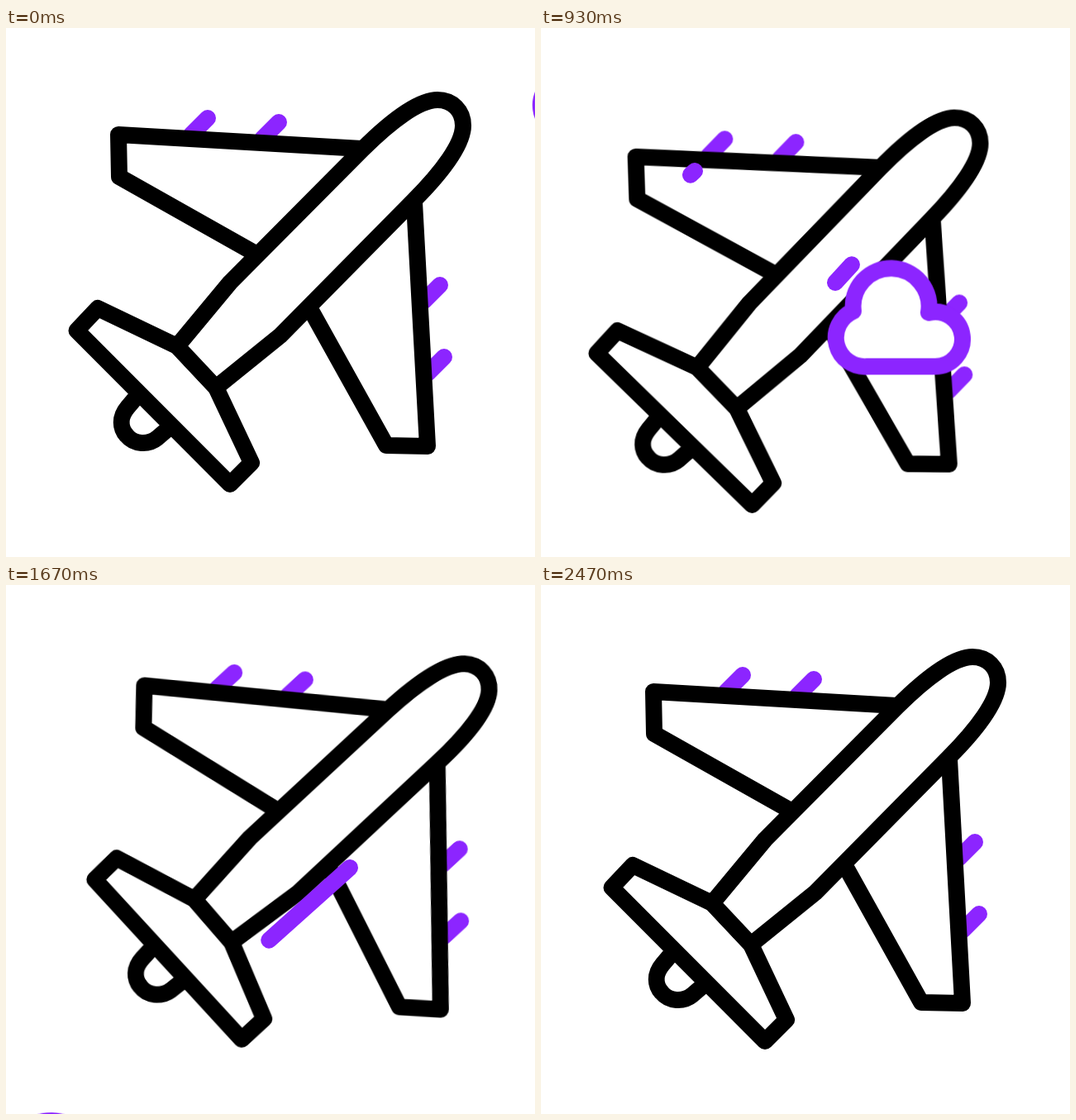
Write an HTML page that moves like this. It is 640 px wide and 640 px high and loops after 2500 ms.

```html
<!DOCTYPE html>
<html lang="en">
<head>
<meta charset="utf-8">
<title>Plane</title>
<style>
  html, body { margin: 0; height: 100%; overflow: hidden; background: #fff; }
  svg { display: block; width: 100%; height: 100%; }
  path { fill: #fff; stroke: #000; stroke-width: 20; stroke-linecap: round; stroke-linejoin: round; }
  .accent { stroke: #8c25ff; }

  #sway, #dip, #tilt, #cloud { animation: 2500ms infinite cubic-bezier(.333, 0, .667, 1); }
  #sway { animation-name: sway; }
  #dip { animation-name: dip; }
  #tilt { animation-name: tilt; transform-origin: 323px 317.5px; }
  #cloud { animation-name: cloud; animation-timing-function: cubic-bezier(.382, 0, .667, 1); }

  @keyframes sway {
    0%, 16% { transform: translateX(0); }
    48% { transform: translateX(-25.5px); }
    69.3% { transform: translateX(25.5px); }
    89.2%, 100% { transform: translateX(0); }
  }
  @keyframes dip {
    0% { transform: translateY(0); animation-timing-function: cubic-bezier(.43, 0, .74, 1); }
    23.2% { transform: translateY(44.7px); animation-timing-function: cubic-bezier(.5, 0, .72, 1); }
    48% { transform: translateY(1.5px); }
    69.3%, 100% { transform: translateY(0); }
  }
  @keyframes tilt {
    0% { transform: rotate(0); }
    25.6% { transform: rotate(-4.1deg); }
    50.4% { transform: rotate(3.2deg); animation-timing-function: cubic-bezier(.3, 0, .72, 1); }
    98.7%, 100% { transform: rotate(0); }
  }
  @keyframes cloud {
    0%, 7.6% { transform: translate(290px, -280.5px); }
    69.6%, 100% { transform: translate(-373px, 361.5px); }
  }

  /* Each streak grows from its top end, then shrinks into its lower end. */
  .streak {
    opacity: 0;
    stroke-dasharray: 0 9;
    animation: streak 2500ms var(--at) infinite cubic-bezier(.333, 0, .667, 1);
  }
  @keyframes streak {
    0% { opacity: 1; stroke-dasharray: 0 9; stroke-dashoffset: 0; }
    13.4% { opacity: 1; stroke-dasharray: 1 9; stroke-dashoffset: 0; }
    28.9% { opacity: 1; stroke-dasharray: 0 9; stroke-dashoffset: -1; }
    28.91%, 100% { opacity: 0; stroke-dasharray: 0 9; stroke-dashoffset: -1; }
  }
</style>
</head>
<body>
<svg viewBox="0 0 640 640">
  <g id="sway"><g id="dip"><g id="tilt">
    <path class="accent" d="M244 109l-20 20M330 114l-20 20M525 311l-20 20M530 398l-20 20"/>
    <path d="M430 146L136 129L137 180L302 273"/>
    <path d="M494 211L510 506L460 505L367 338"/>
    <path d="M158 446L147 459C137 471 138 484 146 493C155 504 172 505 183 496L197 484"/>
    <path d="M207 385L111 339L85.500 366L271 552L297 526L254 435Z"/>
    <path d="M207 385L271 308L431 147C466 112 500 87 522 87C540 87 553 100 553 118C553 140 528 174 493 209L332 372L254 435Z"/>
  </g></g></g>

  <path class="accent streak" style="--at: 33ms" pathLength="1" d="M315 178L172 300"/>
  <path class="accent streak" style="--at: 325ms" pathLength="1" d="M448 208L356 308"/>
  <path class="accent streak" style="--at: 883ms" pathLength="1" d="M186 173L95 257"/>
  <path class="accent streak" style="--at: 1420ms" pathLength="1" d="M416 342L300 446"/>

  <path id="cloud" class="accent" d="M378 342A46 46 0 1 1 469 344A33 33 0 1 1 477 409H395A35 35 0 0 1 378 342Z"/>
</svg>
</body>
</html>
```
